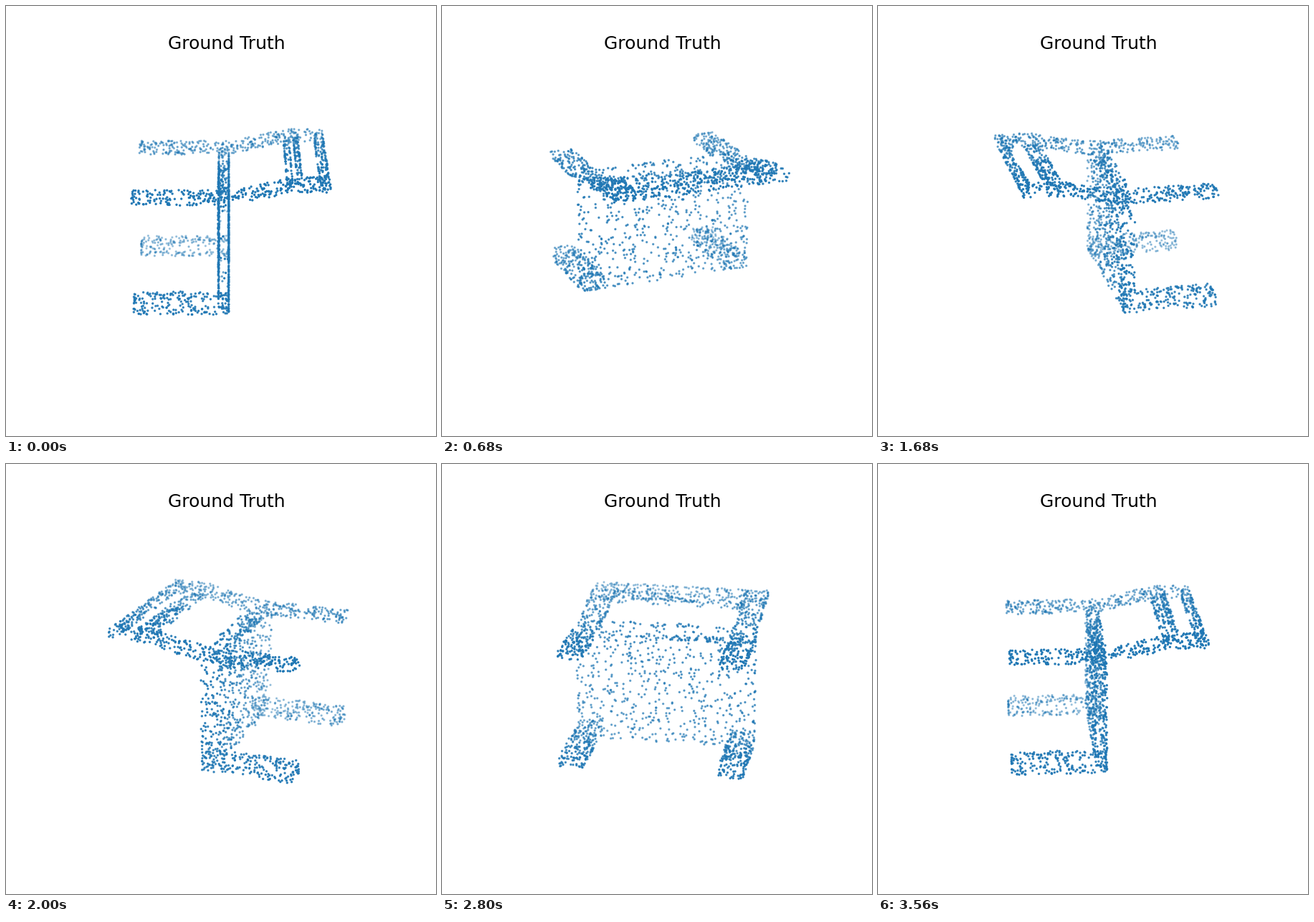
A matplotlib script for the animation above (3600 ms loop, 600 px wide and 600 px high).

```python
import numpy as np
import matplotlib.pyplot as plt
from matplotlib.animation import FuncAnimation
from matplotlib.colors import to_rgb

SIZE, DPI = 600, 100
FRAMES, INTERVAL = 90, 40
CENTER_X, CENTER_Y = 313.8, 296.8    # screen position of the turning axis
DISTANCE = 2497.0                    # camera distance in pixels
ELEV = np.radians(20)
BLUE = to_rgb("#1f77b4")

rng = np.random.default_rng(7)


def box(n, low, high):
    """Random points spread evenly over the surface of a box."""
    low, high = np.array(low, float), np.array(high, float)
    size = high - low
    areas = np.prod(size) / size
    points = low + rng.random((n, 3)) * size
    axis = rng.choice(3, n, p=areas / areas.sum())
    side = rng.random(n) < 0.5
    points[np.arange(n), axis] = np.where(side, low[axis], high[axis])
    return points


def build_cloud():
    parts = [
        box(600, (-17, -125, -92), (-3, 125, 64)),    # panel
        box(110, (-17, -93, 60), (-3, 93, 80)),       # panel top
        box(75, (75, -95, 64), (82, 95, 74.6)),       # cross bars
        box(95, (89, -95, 64), (95, 95, 74.6)),
        box(130, (119, -95, 64), (131, 95, 74.6)),
    ]
    for v0, v1 in ((-125, -93), (93, 125)):
        parts.append(box(320, (-131, v0, 64), (131, v1, 74.6)))    # arm
        parts.append(box(205, (-131, v0, -92), (-3, v1, -71.5)))   # foot
    points = np.vstack(parts)
    # the arms climb behind the panel, then run level
    points[:, 2] += 17.9 * np.clip(points[:, 0] / 82, 0, 1)
    return points


def project(points, turn):
    """Screen x, y and depth towards the camera."""
    u, v, w = points.T
    x = u * np.cos(turn) - v * np.sin(turn)
    near = v * np.cos(turn) + u * np.sin(turn)
    y = w * np.cos(ELEV) - near * np.sin(ELEV)
    depth = near * np.cos(ELEV) + w * np.sin(ELEV)
    scale = DISTANCE / (DISTANCE - depth)
    return CENTER_X + x * scale, CENTER_Y - y * scale, depth


cloud = build_cloud()

fig = plt.figure(figsize=(SIZE / DPI, SIZE / DPI), dpi=DPI, facecolor="white")
ax = fig.add_axes([0, 0, 1, 1])
ax.set_xlim(0, SIZE)
ax.set_ylim(SIZE, 0)
ax.axis("off")
ax.text(307.5, 60, "Ground Truth", fontsize=18, family="DejaVu Sans",
        ha="center", va="baseline", color="black")
dots = ax.scatter(cloud[:, 0], cloud[:, 1], s=2, color=BLUE)


def update(i):
    x, y, depth = project(cloud, 2 * np.pi * i / FRAMES)
    order = np.argsort(depth)
    colors = np.empty((len(cloud), 4))
    colors[:, :3] = BLUE
    colors[:, 3] = 0.3 + 0.7 * (depth - depth.min()) / np.ptp(depth)
    dots.set_offsets(np.column_stack([x, y])[order])
    dots.set_facecolor(colors[order])
    dots.set_edgecolor(colors[order])
    return [dots]


anim = FuncAnimation(fig, update, frames=FRAMES, interval=INTERVAL,
                     repeat=True, repeat_delay=0)
plt.show()
```
